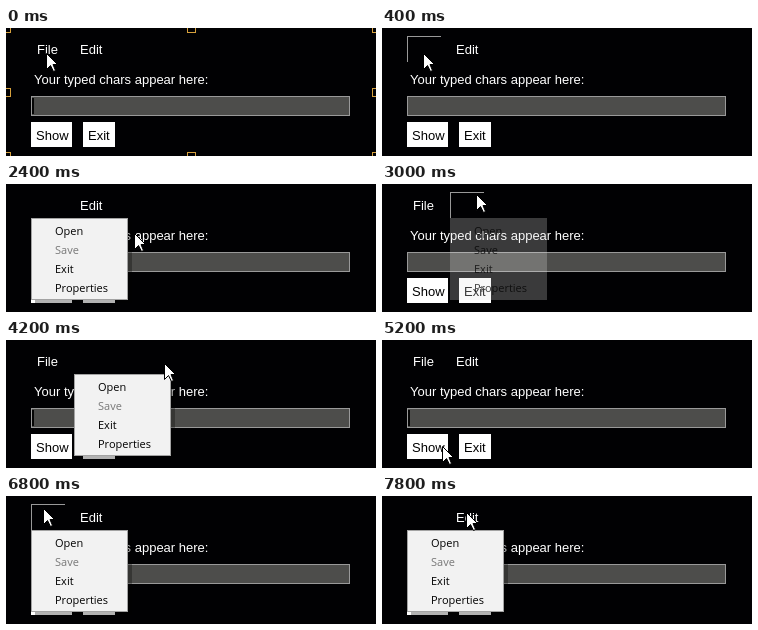
These frames come from a looping animation (370x128 px, 8000 ms). An HTML page with a canvas:

```html
<!DOCTYPE html>
<html lang="en">
<head>
<meta charset="utf-8">
<title>Menu demo</title>
<style>
html, body { margin: 0; width: 100%; height: 100%; overflow: hidden; background: #010103; }
canvas { display: block; width: 370px; height: 128px; }
</style>
</head>
<body>
<canvas id="stage" width="370" height="128"></canvas>
<script>
const ctx = document.getElementById('stage').getContext('2d');
const LOOP = 8000, STEP = 200;
const UI = '13px "Liberation Sans", Arial, sans-serif';
const MENU = '11px "Open Sans", "Noto Sans", sans-serif';

// Places where the pointer rests; longer moves between them bend towards LURE
const LURE = { x: 220, y: 150 };
const stops = [
  { from: 0, to: 0, x: 40, y: 25 },
  { from: 1400, to: 1400, x: 43, y: 24 },
  { from: 2600, to: 3000, x: 94, y: 10 },
  { from: 4200, to: 4200, x: 158, y: 23 },
  { from: 5200, to: 6000, x: 60, y: 106 },
  { from: 6600, to: 6800, x: 37, y: 12 },
  { from: 7800, to: LOOP, x: 84, y: 16 }
];

// Menus open at these times; the hover frame above them goes earlier
const menus = [
  { x: 25, from: 400, hover: 800, to: 2600 },
  { x: 68, from: 2800, hover: 3200, to: 5000 },
  { x: 25, from: 6400, hover: 7000, to: LOOP }
];

function box(x, y, w, h, color) {
  ctx.fillStyle = color;
  ctx.fillRect(x, y, w, h);
}

function label(str, x, y, color, font = UI) {
  ctx.font = font;
  ctx.fillStyle = color;
  ctx.fillText(str, x, y);
}

function frame(x, y, w, h, color) {
  ctx.strokeStyle = color;
  ctx.lineWidth = 1;
  ctx.strokeRect(x + 0.5, y + 0.5, w - 1, h - 1);
}

function pointerAt(t) {
  const i = stops.findLastIndex(s => s.from <= t);
  const a = stops[i], b = stops[i + 1];
  if (t <= a.to || !b) return a;
  const k = (t - a.to) / (b.from - a.to);
  const far = Math.hypot(b.x - a.x, b.y - a.y) > 10;
  const along = axis => {
    const bend = far ? LURE[axis] : (a[axis] + b[axis]) / 2;
    return Math.round((1 - k) ** 2 * a[axis] + 2 * k * (1 - k) * bend + k * k * b[axis]);
  };
  return { x: along('x'), y: along('y') };
}

function drawButton(str, x, w) {
  box(x, 94, w, 25, '#fff');
  label(str, x + 5, 112, '#000');
}

function drawWindow(t, open) {
  box(0, 0, 370, 128, '#010103');
  if (open?.x !== 25) label('File', 31, 26, '#fff');
  if (open?.x !== 68) label('Edit', 74, 26, '#fff');
  label('Your typed chars appear here:', 28, 56, '#fff');

  box(25, 68, 319, 20, '#4d4d4b');
  frame(25, 68, 319, 20, '#999');
  const caretOn = (t + 140) % 1060 < 530;
  if (caretOn) box(26, 70, 2, 16, '#050505');

  drawButton('Show', 25, 41);
  drawButton('Exit', 77, 32);
}

function drawMenu({ x, from, hover }, t) {
  if (t < hover) {
    box(x, 8, 34, 1, '#999');
    box(x, 8, 1, 26, '#999');
  }
  const age = t - from;
  if (age < STEP) return;
  const solid = age >= 2 * STEP;
  if (solid) {
    box(x + 4, 38, 97, 81, 'rgba(0,0,0,0.3)');
    box(x, 34, 97, 82, '#f2f2f2');
    frame(x, 34, 97, 82, '#a3a3a3');
  } else {
    box(x, 34, 97, 82, 'rgba(228,228,228,0.25)');
  }
  ['Open', 'Save', 'Exit', 'Properties'].forEach((s, i) => {
    const color = !solid ? 'rgba(0,0,0,0.75)' : s === 'Save' ? '#777' : '#000';
    label(s, x + 24, 51 + 19 * i, color, MENU);
  });
}

function drawHandles() {
  for (const x of [0, 185, 370])
    for (const y of [0, 64, 128])
      if (x !== 185 || y !== 64) frame(x - 4, y - 4, 9, 9, '#d6a03c');
}

function drawPointer({ x, y }) {
  const arrow = new Path2D('M0 0V16L4 12L7 18L9 17L6.5 11H11Z');
  ctx.save();
  ctx.translate(x + 0.5, y + 0.5);
  ctx.fillStyle = '#fff';
  ctx.strokeStyle = '#000';
  ctx.lineWidth = 1;
  ctx.fill(arrow);
  ctx.stroke(arrow);
  ctx.restore();
}

function draw(now) {
  const t = Math.floor((now % LOOP) / STEP) * STEP;
  const open = menus.find(m => t >= m.from && t < m.to);
  drawWindow(t, open);
  if (open) drawMenu(open, t);
  if (t < STEP) drawHandles();
  drawPointer(pointerAt(t));
}

const start = performance.now();
function tick() {
  draw(performance.now() - start);
  requestAnimationFrame(tick);
}
tick();
</script>
</body>
</html>
```
